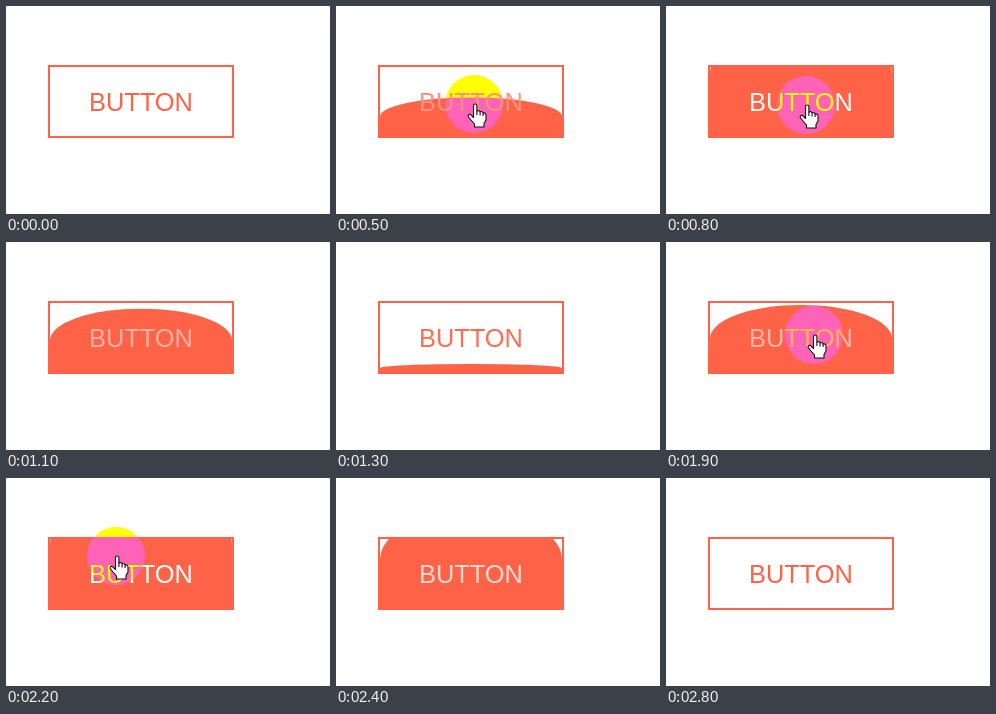
An HTML page with a canvas for the animation above (3100 ms loop, 324 by 208 pixels).

```html
<!DOCTYPE html>
<html lang="en">
<head>
<meta charset="utf-8">
<title>Button fill</title>
<style>
html, body { margin: 0; width: 100%; height: 100%; overflow: hidden; background: #fff; }
canvas { display: block; width: 324px; height: 208px; }
</style>
</head>
<body>
<canvas id="stage" width="324" height="208"></canvas>
<script>
const ctx = document.getElementById('stage').getContext('2d');
const LOOP = 3100, STEP = 100, FADE = 500;
const TOMATO = [255, 99, 71];
const rgb = c => `rgb(${c.map(Math.round).join()})`;

// Hover periods: [enter, leave]
const hovers = [[397, 955], [1744, 2315]];

// Pointer visits: [time, x, y]
const visits = [
  [[300, 211, 176], [400, 165, 126], [500, 138, 98], [600, 136, 97],
   [800, 140, 99], [900, 145, 105], [1000, 150, 160]],
  [[1700, 152, 134], [1800, 150, 108], [1900, 148, 93], [2000, 143, 84],
   [2100, 130, 78], [2200, 110, 78], [2300, 61, 142]]
];

const arrow = new Path2D('M0 0V17L4 13.4L6.7 19.4L9.6 18.1L7 12.3H12.2Z');
const hand = new Path2D('M-1 1.5Q-1 0 .7 0Q2.4 0 2.4 1.5V7Q5 6 5.6 7.8' +
  'Q8 7 8.6 9Q11.5 8.5 11.5 11V16L9.5 19.5V23H0V20L-3.5 16L-6.3 12.5' +
  'Q-6.5 10 -4.2 10.4L-1 13.5Z');
const knuckles = new Path2D('M2.4 7V11M5.6 8V11.5M8.6 9V12');

// CSS "ease": cubic-bezier(.25, .1, .25, 1)
function ease(p) {
  if (p <= 0) return 0;
  if (p >= 1) return 1;
  const bez = (a, b, u) => 3 * a * u * (1 - u) ** 2 + 3 * b * u * u * (1 - u) + u ** 3;
  let lo = 0, hi = 1;
  for (let i = 0; i < 24; i++) {
    const mid = (lo + hi) / 2;
    if (bez(.25, .25, mid) < p) lo = mid; else hi = mid;
  }
  return bez(.1, 1, lo);
}

function hoverAmount(t) {
  return hovers.reduce((sum, [on, off]) =>
    sum + ease((t - on) / FADE) - ease((t - off) / FADE), 0);
}

function pointerAt(t) {
  const path = visits.find(v => t >= v[0][0] && t <= v[v.length - 1][0]);
  if (!path) return null;
  const i = Math.max(1, path.findIndex(k => k[0] >= t));
  const [t0, x0, y0] = path[i - 1], [t1, x1, y1] = path[i];
  const p = (t - t0) / (t1 - t0);
  return { x: x0 + (x1 - x0) * p, y: y0 + (y1 - y0) * p };
}

function drawButton(k) {
  const h = 125 * k, r = h / 2, base = 130;
  if (h > 0.2) {
    ctx.save();
    ctx.beginPath();
    ctx.rect(44, 61, 182, 69);
    ctx.clip();
    ctx.fillStyle = rgb(TOMATO);
    ctx.beginPath();
    ctx.moveTo(44, base);
    ctx.ellipse(135, base - r, 91, r, 0, Math.PI, 2 * Math.PI);
    ctx.lineTo(226, base);
    ctx.fill();
    ctx.restore();
  }
  ctx.strokeStyle = rgb(TOMATO);
  ctx.lineWidth = 2;
  ctx.strokeRect(43, 60, 184, 71);

  ctx.fillStyle = rgb(TOMATO.map(c => c + (255 - c) * k));
  ctx.font = '25.4px "Liberation Sans", Arial, sans-serif';
  ctx.textAlign = 'center';
  ctx.fillText('BUTTON', 135, 104.5);
}

function drawPointer({ x, y }) {
  // Inverting the blue channel turns white yellow and tomato pink
  ctx.globalCompositeOperation = 'difference';
  ctx.fillStyle = '#00f';
  ctx.beginPath();
  ctx.arc(x, y, 29, 0, 2 * Math.PI);
  ctx.fill();
  ctx.globalCompositeOperation = 'source-over';

  const over = x > 42 && x < 228 && y > 59 && y < 132;
  const shape = over ? hand : arrow;
  ctx.save();
  ctx.translate(x + (over ? 0.5 : 0), y);
  ctx.fillStyle = '#fff';
  ctx.strokeStyle = '#111';
  ctx.lineWidth = 1.1;
  ctx.lineJoin = 'round';
  ctx.fill(shape);
  ctx.stroke(shape);
  if (over) ctx.stroke(knuckles);
  ctx.restore();
}

function draw(t) {
  ctx.fillStyle = '#fff';
  ctx.fillRect(0, 0, 324, 208);
  drawButton(hoverAmount(t));
  const pointer = pointerAt(t);
  if (pointer) drawPointer(pointer);
}

const start = performance.now();
function tick() {
  const t = (performance.now() - start) % LOOP;
  draw(Math.floor(t / STEP) * STEP);
  requestAnimationFrame(tick);
}
tick();
</script>
</body>
</html>
```
